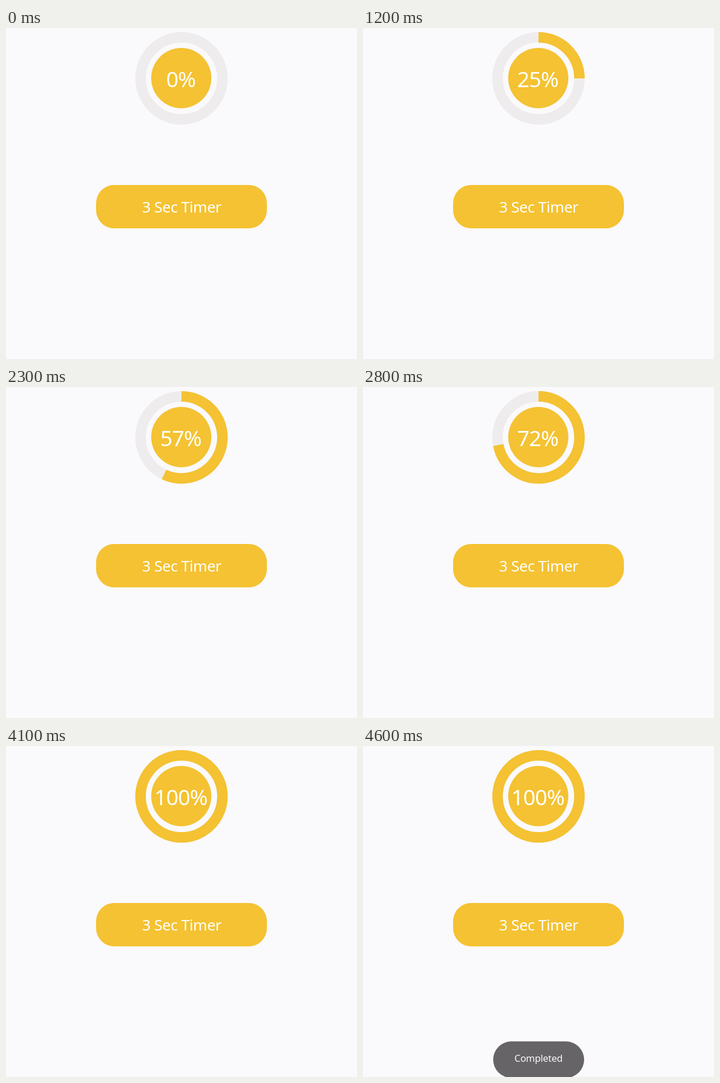
Write an HTML page that moves like this. It is 600 by 565 pixels and loops after 6100 ms.

```html
<!DOCTYPE html>
<html lang="en">
<head>
<meta charset="utf-8">
<title>3 Sec Timer</title>
<style>
  html, body { margin: 0; width: 100%; height: 100%; overflow: hidden; background: #faf9fc; }
  svg { display: block; width: 600px; height: 565px; }
  text { font-family: "Noto Sans", "Open Sans", sans-serif; fill: #fff; text-anchor: middle; }
  #label { font-size: 37px; letter-spacing: -0.9px; }
  #caption { font-size: 26px; letter-spacing: -0.45px; }
  #toast text { font-size: 16.5px; letter-spacing: -0.3px; fill: #f8f7f8; }
</style>
</head>
<body>
<svg viewBox="0 0 600 565">
  <rect width="600" height="565" fill="#faf9fc"/>
  <circle cx="300" cy="86" r="70" fill="none" stroke="#eeeced" stroke-width="18"/>
  <path id="arc" fill="none" stroke="#f4c232" stroke-width="18"/>
  <circle cx="299.6" cy="85.5" r="51.4" fill="#f4c232"/>
  <text id="label" x="298.7" y="100.7">0%</text>
  <rect x="154" y="268" width="292" height="74" rx="31" fill="#f4c232"/>
  <text id="caption" x="300.3" y="315.3">3 Sec Timer</text>
  <g id="toast" opacity="0">
    <rect x="222.5" y="504.3" width="155.5" height="62" rx="31" fill="#666466"/>
    <text x="299.9" y="538.6">Completed</text>
  </g>
</svg>
<script>
const LOOP = 6100, STEP = 100;
const START = 324, RATE = 0.029;
const CX = 300, CY = 86, R = 70;
const arc = document.getElementById("arc");
const label = document.getElementById("label");
const toast = document.getElementById("toast");

const clamp = (v, lo, hi) => Math.min(hi, Math.max(lo, v));

function arcPath(percent) {
  if (percent <= 0) return "";
  const top = `M${CX} ${CY - R}`;
  const to = (x, y, large) => `A${R} ${R} 0 ${large} 1 ${x} ${y}`;
  if (percent >= 100) return top + to(CX, CY + R, 0) + to(CX, CY - R, 0) + "Z";
  const a = percent / 50 * Math.PI;
  return top + to(CX + R * Math.sin(a), CY - R * Math.cos(a), percent > 50 ? 1 : 0);
}

function draw(time) {
  const t = Math.floor((time % LOOP) / STEP) * STEP;
  const percent = clamp(Math.round((t - START) * RATE), 0, 100);
  arc.setAttribute("d", arcPath(percent));
  label.textContent = percent + "%";
  toast.setAttribute("opacity", clamp((t - 4100) / 400, 0, 1));
}

const origin = performance.now();
function tick() {
  draw(performance.now() - origin);
  requestAnimationFrame(tick);
}
tick();
</script>
</body>
</html>
```
